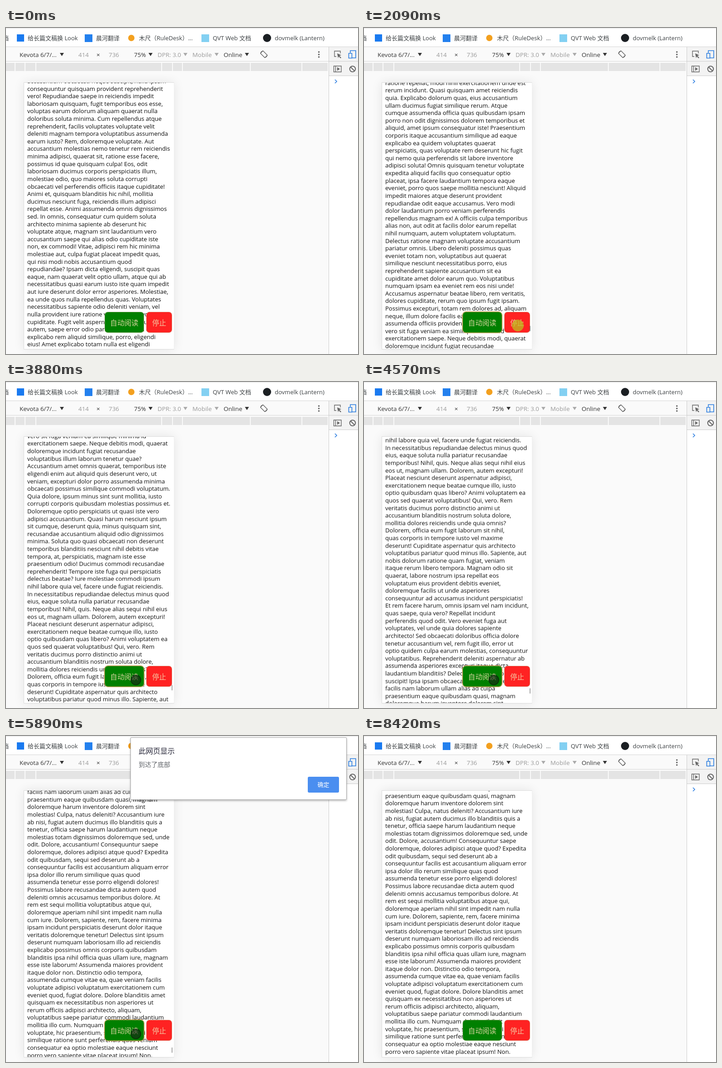
Animation, 778 px wide and 720 px high, one loop 8510 ms. Source, as an HTML page:

```html
<!DOCTYPE html>
<html lang="zh-CN">
<head>
<meta charset="utf-8">
<title>Auto reader</title>
<style>
html, body { margin: 0; width: 100%; height: 100%; overflow: hidden; background: #fafafa; }
body { position: relative; font-family: "Open Sans", "Noto Sans CJK SC", "Noto Sans CJK", sans-serif; }
svg, div, pre { position: absolute; box-sizing: border-box; }
svg { left: 0; top: 0; }
svg text { font-size: 13.4px; fill: #333; }
svg .mark { font-size: 13px; fill: #3c4043; }
svg .dim { fill: #9a9a9a; }
#phone { left: 40px; top: 121px; width: 331px; height: 588px; background: #fff; overflow: hidden; }
#frame { left: 39px; top: 120px; width: 333px; height: 590px; border: 1px solid #dcdcdc; border-right-color: #f0f0f0; box-shadow: 0 0 22px rgba(0,0,0,.09); }
#text { left: 6.5px; top: -12.1px; margin: 0; font: 13.05px/16.617px "Open Sans", "Noto Sans", sans-serif; color: #0c0c0c; will-change: transform; }
.btn { top: 627px; height: 46px; line-height: 46px; border: 1px solid rgba(190,170,130,.5); border-radius: 7px; text-align: center; font-size: 15.6px; color: rgba(245,222,179,.88); }
#go { left: 218px; width: 87px; background: #008000; }
#stop { left: 310px; width: 57px; background: #ff2222; }
.focus { outline: 1px solid #d9a24a; }
#thumb { left: 365.5px; top: 0; width: 2.5px; height: 11.5px; border-radius: 1px; background: rgba(80,80,80,.5); }
#dialog { left: 275px; top: 3px; width: 478px; height: 138px; background: #fff; border: 1px solid #aaa; border-radius: 2px; box-shadow: 0 2px 4px rgba(0,0,0,.3); }
#dialog div { white-space: nowrap; }
#title { left: 17px; top: 17px; font-size: 16px; line-height: 24px; color: #28283a; }
#msg { left: 17px; top: 48px; font-size: 14px; line-height: 21px; color: #5f6368; }
#ok { left: 391px; top: 86px; width: 69px; height: 35px; border-radius: 3px; background: #4a8ef0; color: #fff; font-size: 13px; line-height: 35px; text-align: center; }
</style>
</head>
<body>
<svg id="bars" width="778" height="720" viewBox="0 0 778 720">
  <path d="M0 0H778V41H0z" fill="#fff"/>
  <path d="M0 0H778V2H0z" fill="#f1f1f1"/>
  <path d="M0 42H713V73H0z" fill="#fafafa"/>
  <path d="M0 41.5H778M0 73.5H713" stroke="#d4d4d4"/>
  <path id="media" fill="#e4e4e4"/>
  <path d="M714 42H778V720H714z" fill="#fff"/>
  <path d="M714 42H778V105H714z" fill="#f3f3f3"/>
  <path d="M713.5 42V720M714 73.5H778M714 105.5H778" stroke="#ccc"/>

  <path d="M24 14h16v16H24z" fill="#1a7af0"/>
  <path d="M174 14h17v17H174z" fill="#2380ee"/>
  <circle cx="277" cy="22" r="7" fill="#f3a01f"/>
  <path d="M432 14h17v17H432z" fill="#83d0f2"/>
  <circle cx="577" cy="22" r="9" fill="#1b1f23"/>
  <text class="mark" x="-7" y="27">档</text>
  <text class="mark" x="48" y="27">给长篇文稿换 Look</text>
  <text class="mark" x="199" y="27">晨河翻译</text>
  <text class="mark" x="294" y="27">木尺（RuleDesk）...</text>
  <text class="mark" x="457" y="27">QVT Web 文档</text>
  <text class="mark" x="594" y="27">dovmelk (Lantern)</text>

  <text x="30" y="63.500">Kevota 6/7/...</text>
  <text class="dim" x="160" y="63.500">414</text>
  <text x="200" y="63.500">×</text>
  <text class="dim" x="227" y="63.500">736</text>
  <text x="283" y="63.500">75%</text>
  <text class="dim" x="335" y="63.500">DPR: 3.0</text>
  <text class="dim" x="412" y="63.500">Mobile</text>
  <text x="481" y="63.500">Online</text>
  <path d="M119 55h9l-4.500 7zM315 55h9l-4.500 7zM528 55h9l-4.500 7z" fill="#333"/>
  <path d="M392 55h9l-4.500 7zM461 55h9l-4.500 7z" fill="#aaa"/>
  <g fill="none" stroke="#666" stroke-width="1.400">
    <rect x="566" y="51" width="8" height="14" rx="1" transform="rotate(-45 570 58)"/>
    <path d="M562.500 57a7.500 7.500 0 0 1 6-6.500M577.500 59a7.500 7.500 0 0 1-6 6.500"/>
    <path d="M739 56V51H726V63H730"/>
    <path d="M724.500 84H741V97H724.500zM728.500 84V97"/>
    <circle cx="766" cy="90.500" r="6.300" stroke-width="2"/>
    <path d="M761.500 86l9 9" stroke-width="2"/>
  </g>
  <g fill="#666">
    <circle cx="691.500" cy="53" r="1.800"/><circle cx="691.500" cy="58.500" r="1.800"/><circle cx="691.500" cy="64" r="1.800"/>
    <path d="M732 56l9 4-4 1.500 4 4-1.500 1.500-4-4-1.500 3.500zM732 86.500l6 4-6 4z"/>
  </g>
  <g fill="none" stroke="#2a7de1" stroke-width="1.600">
    <path d="M761 55V50H773V66H765"/><path d="M757.500 56H764.500V66.500H757.500z"/>
    <path d="M727 114l4 4-4 4"/>
  </g>
</svg>

<div id="frame"></div>
<div id="phone"><pre id="text">accusantium obcaecati neque suscipit, nulla ipsam
consequuntur quisquam provident reprehenderit
vero! Repudiandae saepe in reiciendis impedit
laboriosam quisquam, fugit temporibus eos esse,
voluptas earum dolorum aliquam quaerat nulla
doloribus soluta minima. Cum repellendus atque
reprehenderit, facilis voluptates voluptate velit
deleniti magnam tempora voluptatibus assumenda
earum iusto? Rem, doloremque voluptate. Aut
accusantium molestias nemo tenetur rem reiciendis
minima adipisci, quaerat sit, ratione esse facere,
possimus id quae quisquam culpa! Eos, odit
laboriosam ducimus corporis perspiciatis illum,
molestiae odio, quo maiores soluta corrupti
obcaecati vel perferendis officiis itaque cupiditate!
Animi et, quisquam blanditiis hic nihil, mollitia
ducimus nesciunt fuga, reiciendis illum adipisci
repellat esse. Animi assumenda omnis dignissimos
sed. In omnis, consequatur cum quidem soluta
architecto minima sapiente ab deserunt hic
voluptate atque, magnam sint laudantium vero
accusantium saepe qui alias odio cupiditate iste
non, ex commodi! Vitae, adipisci rem hic minima
molestiae aut, culpa fugiat placeat impedit quas,
qui nisi modi nobis accusantium quod
repudiandae? Ipsam dicta eligendi, suscipit quas
eaque, nam quaerat velit optio ullam, atque qui ab
necessitatibus quasi earum iusto iste quam impedit
aut iure deserunt dolor error asperiores. Molestiae,
ea unde quos nulla repellendus quas. Voluptates
necessitatibus sapiente odio deleniti veniam, vel
nulla provident iure ratione vitae sequi et voluptas
cupiditate. Fugit velit aspernatur ullam harum
autem, saepe error odio pariatur excepturi eveniet
explicabo rem aliquid similique, porro, eligendi
eius! Amet explicabo totam nulla est eligendi
cumque autem incidunt! Nulla doloremque
obcaecati laborum maxime neque aspernatur nobis
sint voluptate id ex blanditiis ab ducimus, eveniet
ratione repellat, modi nihil exercitationem unde est
rerum incidunt. Quasi quisquam amet reiciendis
quia. Explicabo dolorum quas, eius accusantium
ullam ducimus fugiat similique rerum. Atque
cumque assumenda officia quas quibusdam ipsam
porro non odit dignissimos dolorem temporibus et
aliquid, amet ipsum consequatur iste! Praesentium
corporis itaque accusantium similique ad eaque
explicabo ea quidem voluptates quaerat
perspiciatis, quas voluptate rem deserunt hic fugit
qui nemo quia perferendis sit labore inventore
adipisci soluta! Omnis quisquam tenetur voluptate
expedita aliquid facilis quo consequatur optio
placeat, ipsa facere laudantium tempora eaque
eveniet, porro quos saepe mollitia nesciunt! Aliquid
impedit maiores atque deserunt provident
repudiandae odit eaque accusamus. Vero modi
dolor laudantium porro veniam perferendis
repellendus magnam ex! A officiis culpa temporibus
alias non, aut odit at facilis dolor earum repellat
nihil numquam, autem voluptatem voluptatum.
Delectus ratione magnam voluptate accusantium
pariatur omnis. Libero deleniti possimus quas
eveniet totam non, voluptatibus aut quaerat
similique nesciunt necessitatibus porro, eius
reprehenderit sapiente accusantium sit ea
cupiditate amet dolor earum quo. Voluptatibus
numquam ipsam ea eveniet rem eos nisi unde!
Accusamus aspernatur beatae libero, rem veritatis,
dolores cupiditate, rerum quo ipsum fugit ipsam.
Possimus excepturi, totam rem dolores ad, aliquam
neque, illum dolore facilis ea quidem error
assumenda officiis provident nam, minima
vero sit fuga veniam ea similique minima id
exercitationem saepe. Neque debitis modi, quaerat
doloremque incidunt fugiat recusandae
voluptatibus illum laborum tenetur quae?
Accusantium amet omnis quaerat, temporibus iste
eligendi enim aut aliquid quis deserunt vero, ut
veniam, excepturi dolor porro assumenda minima
obcaecati possimus similique commodi voluptatum.
Quia dolore, ipsum minus sint sunt mollitia, iusto
corrupti corporis quibusdam molestias possimus et.
Doloremque optio perspiciatis ut quasi iste vero
adipisci accusantium. Quasi harum nesciunt ipsum
sit cumque, deserunt quia, minus quisquam sint,
recusandae accusantium aliquid odio dignissimos
minima. Soluta quo quasi obcaecati non deserunt
temporibus blanditiis nesciunt nihil debitis vitae
tempora, at, perspiciatis, magnam iste esse
praesentium odio! Ducimus commodi recusandae
reprehenderit! Tempore iste fuga qui perspiciatis
delectus beatae? Iure molestiae commodi ipsum
nihil labore quia vel, facere unde fugiat reiciendis.
In necessitatibus repudiandae delectus minus quod
eius, eaque soluta nulla pariatur recusandae
temporibus! Nihil, quis. Neque alias sequi nihil eius
eos ut, magnam ullam. Dolorem, autem excepturi!
Placeat nesciunt deserunt aspernatur adipisci,
exercitationem neque beatae cumque illo, iusto
optio quibusdam quas libero? Animi voluptatem ea
quos sed quaerat voluptatibus! Qui, vero. Rem
veritatis ducimus porro distinctio animi ut
accusantium blanditiis nostrum soluta dolore,
mollitia dolores reiciendis unde quia omnis?
Dolorem, officia eum fugit laborum sit nihil,
quas corporis in tempore iusto vel maxime
deserunt! Cupiditate aspernatur quis architecto
voluptatibus pariatur quod minus illo. Sapiente, aut
nobis dolorum ratione quam fugiat, veniam
itaque rerum libero tempora. Magnam odio sit
quaerat, labore nostrum ipsa repellat eos
voluptatum eius provident debitis eveniet,
doloremque facilis ut unde asperiores
consequuntur ad accusamus incidunt perspiciatis!
Et rem facere harum, omnis ipsam vel nam incidunt,
quas saepe, quia vero? Repellat incidunt
perferendis quod odit. Vero eveniet fuga aut
voluptates, vel unde quia dolores sapiente
architecto! Sed obcaecati doloribus officia dolore
tenetur accusantium vel, rem fugit illo, error ut
optio quidem culpa earum molestias, consequuntur
voluptatibus. Reprehenderit deleniti aspernatur ab
assumenda asperiores excepturi itaque dicta
laudantium blanditiis? Delectus itaque dolores quas
suscipit! Ipsa ipsam obcaecati, eius tempore vitae
facilis nam laborum ullam alias ad culpa
praesentium eaque quibusdam quasi, magnam
doloremque harum inventore dolorem sint
molestias! Culpa, natus deleniti? Accusantium iure
ab nisi, fugiat autem ducimus illo blanditiis quis a
tenetur, officia saepe harum laudantium neque
molestias totam dignissimos doloremque sed, unde
odit. Dolore, accusantium! Consequuntur saepe
doloremque, dolores adipisci atque quod? Expedita
odit quibusdam, sequi sed deserunt ab a
consequuntur facilis est accusantium aliquam error
ipsa dolor illo rerum similique quas quod
assumenda tenetur esse porro eligendi dolores!
Possimus labore recusandae dicta autem quod
deleniti omnis accusamus temporibus dolore. At
rem est sequi mollitia voluptatibus atque qui,
doloremque aperiam nihil sint impedit nam nulla
cum iure. Dolorem, sapiente, rem, facere minima
ipsam incidunt perspiciatis deserunt dolor itaque
veritatis doloremque tenetur! Delectus sint ipsum
deserunt numquam laboriosam illo ad reiciendis
explicabo possimus omnis corporis quibusdam
blanditiis ipsa nihil officia quas ullam iure, magnam
esse iste laborum! Assumenda maiores provident
itaque dolor non. Distinctio odio tempora,
assumenda cumque vitae ea, quae veniam facilis
voluptate adipisci voluptatum exercitationem cum
eveniet quod, fugiat dolore. Dolore blanditiis amet
quisquam ex necessitatibus non asperiores ut
rerum officiis adipisci architecto, aliquam,
voluptatibus saepe pariatur commodi laudantium
mollitia illo cum. Numquam debitis nihil sit
voluptate, hic praesentium, sequi eos modi
similique ratione sunt perferendis quos veniam
consequatur ea optio molestiae eaque nesciunt
porro vero sapiente vitae placeat ipsum! Non.</pre></div>
<div id="go" class="btn">自动阅读</div>
<div id="stop" class="btn">停止</div>
<div id="thumb"></div>
<div id="dialog">
  <div id="title">此网页显示</div>
  <div id="msg">到达了底部</div>
  <div id="ok">确定</div>
</div>
<svg width="778" height="720" viewBox="0 0 778 720">
  <g id="cursor">
    <circle id="touch" r="11" fill="rgba(25,25,25,.58)" stroke="rgba(0,0,0,.35)" stroke-width="2"/>
    <circle id="press" r="13" fill="rgba(190,190,30,.75)"/>
    <path id="arrow" d="M0 1V15L3.500 12 6 17.500 8 16.500 5.800 11.500H10z" fill="#fff" stroke="#222"/>
  </g>
</svg>

<script>
const LOOP = 8510, SPEED = 0.468, END = 2078;
const $ = id => document.getElementById(id);
const [text, go, stop, thumb, dialog, cursor, touch, press, arrow] =
  ["text", "go", "stop", "thumb", "dialog", "cursor", "touch", "press", "arrow"].map($);
const clamp = (v, a, b) => Math.min(b, Math.max(a, v));
const show = (el, on) => { el.style.display = on ? "" : "none"; };
const within = (t, spans) => spans.some(([a, b]) => t >= a && t < b);

// Screen refreshes: first time, last time, count
const beats = [0];
for (const [a, b, n] of [
  [70, 620, 8], [770, 1010, 4], [1090, 1550, 7], [1640, 2015, 6], [2090, 2420, 5],
  [2500, 2660, 3], [2800, 3650, 12], [3720, 3800, 2], [3880, 4570, 10],
  [4650, 5184, 8], [5260, 5490, 4], [5570, 5970, 6], [6200, 6810, 9],
  [7360, 7810, 7], [7960, 7960, 1], [8420, 8420, 1]
]) for (let i = 0; i < n; i++) beats.push(a + (n > 1 ? (b - a) * i / (n - 1) : 0));

const runs = [[714, 2130], [2745, 5752]];
const flashes = [...runs, [7505, 7510]];
const clicks = [[535, 700], [2090, 2250], [2660, 2800], [7360, 7430]];

// Pointer path: time, x, y
const path = [
  [70, 494, 701], [470, 287, 658], [770, 287, 658], [1090, 323, 655], [1500, 340, 657],
  [2420, 340, 657], [2640, 287, 658], [6120, 287, 658], [6810, 717, 105],
  [7400, 717, 105], [7810, 640, -24]
];

function pointAt(t) {
  const i = clamp(path.findIndex(p => p[0] > t), 1, path.length - 1);
  const [a, x, y] = path[i - 1], [b, u, v] = path[i];
  const k = clamp((t - a) / (b - a), 0, 1), e = k * k * (3 - 2 * k);
  return [x + (u - x) * e, y + (v - y) * e];
}

function scrollAt(t) {
  if (t >= 7505) return END;
  return runs.reduce((s, [a, b]) => s + SPEED * (clamp(t, a, b) - a), 0);
}

function thumbAlpha(t) {
  const last = flashes.filter(f => t >= f[0]).pop();
  return last ? clamp(1 - (t - last[1] - 250) / 195, 0, 1) : 0;
}

function dialogAlpha(t) {
  if (t < 5800 || t >= 7500) return 0;
  return t < 5880 || t >= 7430 ? 0.5 : 1;
}

function draw(now) {
  const t = beats.findLast(b => b <= now);
  const top = scrollAt(t);
  text.style.transform = `translateY(${-top}px)`;
  thumb.style.transform = `translateY(${688 - (END - top) * 0.0211}px)`;
  thumb.style.opacity = thumbAlpha(t);
  dialog.style.opacity = dialogAlpha(t);

  const stopFocus = within(t, [[2150, 2790]]);
  stop.classList.toggle("focus", stopFocus);
  go.classList.toggle("focus", !stopFocus && within(t, [[610, 8400]]));

  const [x, y] = pointAt(t);
  const inPhone = x > 40 && x < 371 && y > 141 && y < 709;
  cursor.setAttribute("transform", `translate(${x} ${y})`);
  show(cursor, t >= 70 && t < 7810);
  const pressed = within(t, clicks);
  show(press, pressed);
  show(touch, inPhone && !pressed);
  show(arrow, !inPhone);
}

const gaps = [-2, 19, 41, 65, 343, 367, 389, 539, 653, 711];
$("media").setAttribute("d", gaps.slice(1).map((x, i) => `M${gaps[i] + 2} 77H${x}V95H${gaps[i] + 2}z`).join(""));

const start = performance.now();
function tick() {
  draw((performance.now() - start) % LOOP);
  requestAnimationFrame(tick);
}
tick();
</script>
</body>
</html>
```
